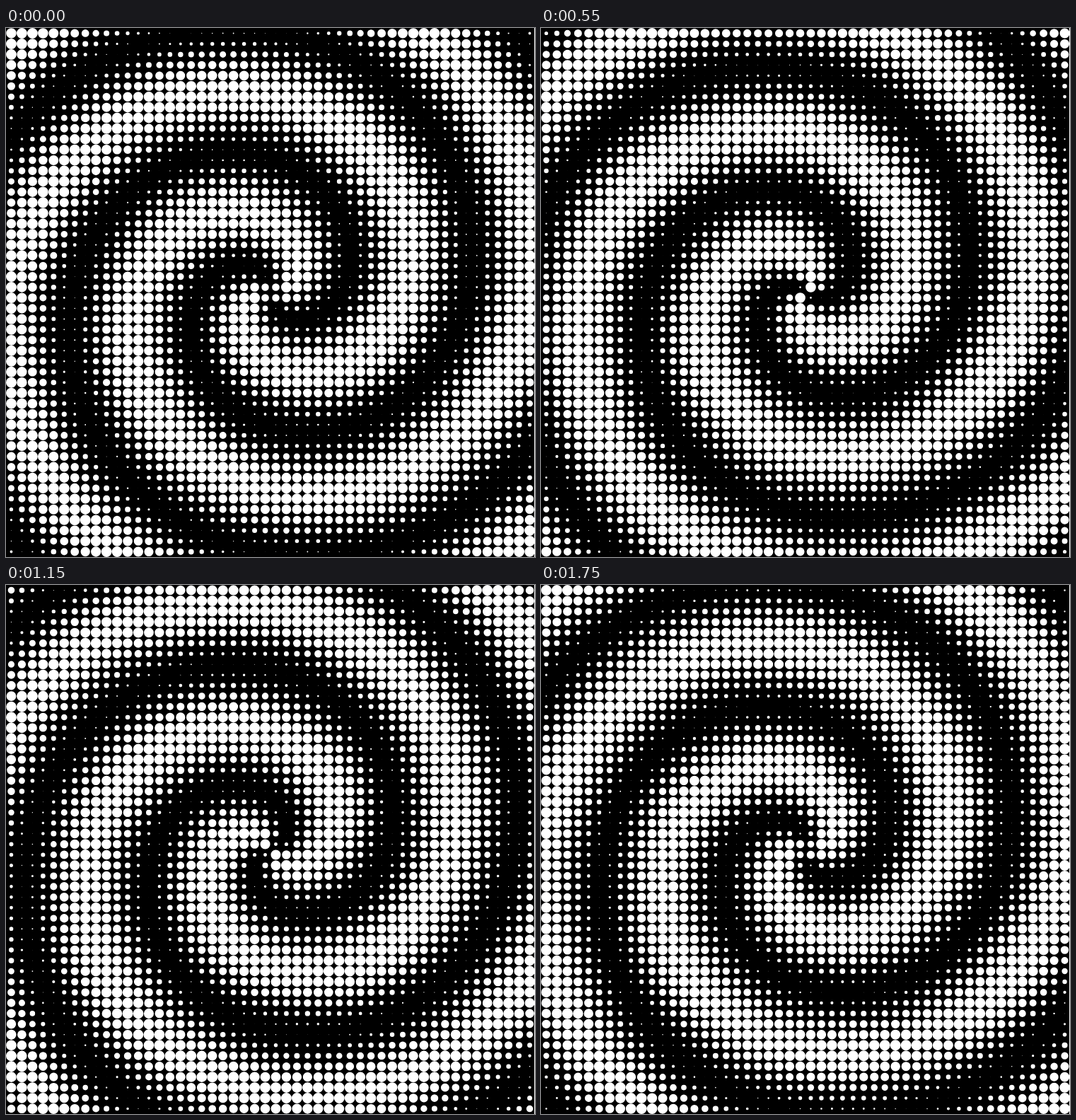
Write an HTML page with a canvas that moves like this. It is 748x748 px and loops after 1.8 s.

```html
<!DOCTYPE html>
<html lang="en">
<head>
<meta charset="utf-8">
<title>Halftone spiral</title>
<style>
  html, body { margin: 0; width: 100%; height: 100%; overflow: hidden; background: #000; }
  canvas { display: block; width: 748px; height: 748px; }
</style>
</head>
<body>
<canvas id="stage" width="748" height="748"></canvas>
<script>
const SIZE = 748, CELLS = 50, PITCH = SIZE / CELLS;
const LOOP = 1800, STEP = 50;
const CELLS_PER_BAND = 12;
const START = -Math.PI / 18;

const ctx = document.getElementById('stage').getContext('2d');

// Each dot keeps its place and its fixed angle on the spiral.
const dots = [];
for (let row = 0; row < CELLS; row++) {
  for (let col = 0; col < CELLS; col++) {
    const dx = col + 0.5 - CELLS / 2;
    const dy = row + 0.5 - CELLS / 2;
    dots.push({
      x: (col + 0.5) * PITCH,
      y: (row + 0.5) * PITCH,
      angle: Math.atan2(dy, dx) + Math.PI * Math.hypot(dx, dy) / CELLS_PER_BAND + START
    });
  }
}

function draw(ms) {
  const turn = Math.PI * Math.floor((ms % LOOP) / STEP) * STEP / LOOP;
  ctx.fillStyle = '#000';
  ctx.fillRect(0, 0, SIZE, SIZE);
  ctx.fillStyle = '#fff';
  ctx.fillRect(SIZE - 1, 0, 1, SIZE);
  ctx.beginPath();
  for (const { x, y, angle } of dots) {
    // The absolute value gives the spiral its two arms.
    const r = PITCH / 2 * Math.abs(Math.cos(angle + turn));
    ctx.moveTo(x + r, y);
    ctx.arc(x, y, r, 0, 2 * Math.PI);
  }
  ctx.fill();
}

const begin = performance.now();
function tick() {
  draw(performance.now() - begin);
  requestAnimationFrame(tick);
}
tick();
</script>
</body>
</html>
```
